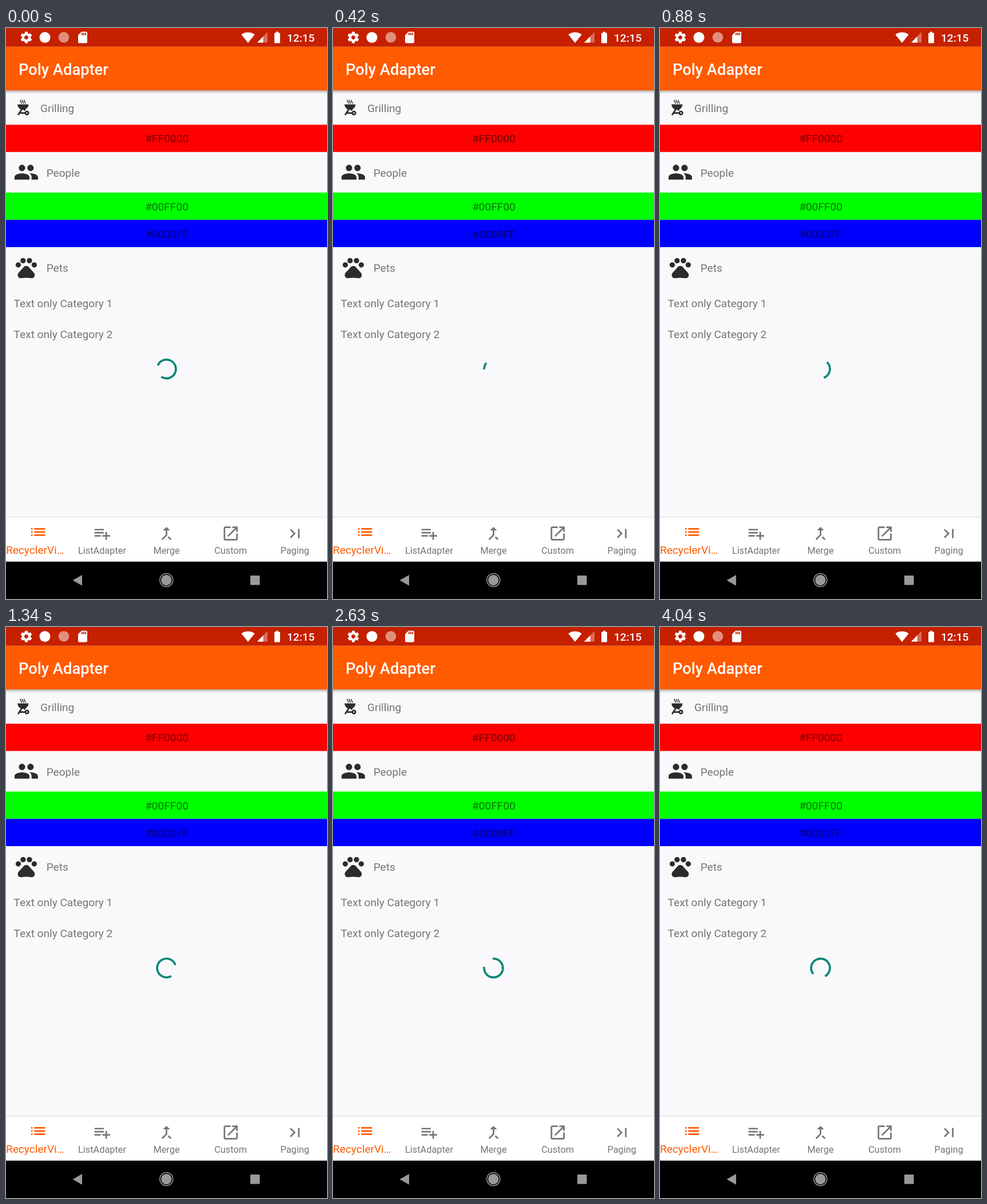
Recreate the animation shown at these times as an HTML page. Size 561 px wide and 998 px high, loop 4.08 s.

```html
<!DOCTYPE html>
<html lang="en">
<head>
<meta charset="utf-8">
<title>Adapter demo</title>
<style>
  html, body { margin: 0; width: 100%; height: 100%; overflow: hidden; background: #f9f9fb; }
  svg { display: block; width: 100%; height: 100%; }
  text { font: 19.09px Roboto, sans-serif; fill: #757575; }
  .title { font-size: 27.27px; font-weight: 500; fill: #fff; }
  .clock { font-weight: 500; fill: #fff; }
  .hex { fill: #000; fill-opacity: .54; }
  .hex, .tab { text-anchor: middle; }
  .tab { font-size: 16.36px; }
  .on { fill: #ff5b00; }
</style>
</head>
<body>
<svg id="stage" viewBox="0 0 561 998">
  <defs>
    <linearGradient id="shade" x2="0" y2="1">
      <stop stop-color="#000" stop-opacity=".28"/>
      <stop offset="1" stop-color="#000" stop-opacity="0"/>
    </linearGradient>
  </defs>
  <rect width="561" height="998" fill="#f9f9fb"/>
  <rect y="109" width="561" height="6" fill="url(#shade)"/>
  <rect y="32.7" width="561" height="76.4" fill="#ff5b00"/>
  <rect width="561" height="32.7" fill="#c52000"/>
  <text class="title" x="22" y="81.5">Poly Adapter</text>

  <!-- status bar -->
  <circle cx="68" cy="16.5" r="9.5" fill="#fff"/>
  <circle cx="101" cy="16.3" r="9.3" fill="#e18f7c"/>
  <path d="M439 25.500H457V7z" fill="#fff" fill-opacity=".35"/>
  <path d="M439 25.500H449.500V14.700z" fill="#fff"/>
  <text class="clock" x="491" y="23.500">12:15</text>

  <!-- list -->
  <rect y="169" width="561" height="47.7" fill="#f00"/>
  <rect y="287.600" width="561" height="47.800" fill="#0f0"/>
  <rect y="335.300" width="561" height="47.700" fill="#00f"/>
  <text x="60" y="146.700">Grilling</text>
  <text class="hex" x="281" y="200">#FF0000</text>
  <text x="70.700" y="260">People</text>
  <text class="hex" x="281" y="318.800">#00FF00</text>
  <text class="hex" x="281" y="366.500">#0000FF</text>
  <text x="70.700" y="426.300">Pets</text>
  <text x="13.600" y="488.200">Text only Category 1</text>
  <text x="13.600" y="541.800">Text only Category 2</text>
  <path id="spinner" fill="none" stroke="#008577" stroke-width="3.64" stroke-linecap="square"/>

  <!-- bottom tabs -->
  <rect y="854" width="561" height="3" fill="#ececee"/>
  <rect y="856" width="561" height="77" fill="#fff"/>
  <text class="on" x="0" y="918.700">RecyclerVi…</text>
  <text class="tab" x="168" y="918.700">ListAdapter</text>
  <text class="tab" x="280.500" y="918.700">Merge</text>
  <text class="tab" x="392.700" y="918.700">Custom</text>
  <text class="tab" x="504.700" y="918.700">Paging</text>

  <!-- system keys -->
  <rect y="932.700" width="561" height="66" fill="#000"/>
  <g fill="#999">
    <path d="M116.500 965.300L133 956V974.700z"/>
    <circle cx="280.300" cy="965" r="9.200"/>
    <circle cx="280.300" cy="965" r="11.500" fill="none" stroke="#999" stroke-width="1.500"/>
    <rect x="427" y="957" width="16.500" height="16.500" rx="1.200"/>
  </g>
</svg>
<script>
const stage = document.getElementById('stage');
const spinner = document.getElementById('spinner');

function add(tag, attrs) {
  const el = document.createElementNS('http://www.w3.org/2000/svg', tag);
  for (const key in attrs) el.setAttribute(key, attrs[key]);
  return stage.appendChild(el);
}

// Icons are drawn on a 24-unit grid.
function icon(x, y, scale, fill, d) {
  add('path', { d, fill, transform: `translate(${x} ${y}) scale(${scale})` });
}

const dp = 561 / 411.4, white = '#fff', dark = '#2c2c2c', gray = '#757575';

// settings, memory card, wifi, battery
icon(23.5, 4.5, 1, white, 'M19.43 12.98c.04-.32.07-.64.07-.98s-.03-.66-.07-.98l2.11-1.65c.19-.15.24-.42.12-.64l-2-3.46c-.12-.22-.39-.3-.61-.22l-2.49 1c-.52-.4-1.08-.73-1.69-.98l-.38-2.65C14.46 2.18 14.25 2 14 2h-4c-.25 0-.46.18-.49.42l-.38 2.65c-.61.25-1.17.59-1.69.98l-2.49-1c-.23-.09-.49 0-.61.22l-2 3.46c-.13.22-.07.49.12.64l2.11 1.65c-.04.32-.07.65-.07.98s.03.66.07.98l-2.11 1.65c-.19.15-.24.42-.12.64l2 3.46c.12.22.39.3.61.22l2.49-1c.52.4 1.08.73 1.69.98l.38 2.65c.03.24.24.42.49.42h4c.25 0 .46-.18.49-.42l.38-2.65c.61-.25 1.17-.59 1.69-.98l2.49 1c.23.09.49 0 .61-.22l2-3.46c.12-.22.07-.49-.12-.64l-2.11-1.65zM12 15.5c-1.93 0-3.5-1.57-3.5-3.5s1.57-3.5 3.5-3.5 3.5 1.57 3.5 3.5-1.57 3.5-3.5 3.5z');
icon(122, 4.5, 1, white, 'M18 2h-8L4.02 8 4 20c0 1.1.9 2 2 2h12c1.1 0 2-.9 2-2V4c0-1.1-.9-2-2-2zm-6 6h-2V4h2v4zm3 0h-2V4h2v4zm3 0h-2V4h2v4z');
icon(411, 4.5, 1, white, 'M12 21.5L23.64 7c-.45-.34-4.93-4-11.64-4S.81 6.66.36 7z');
icon(462, 4.5, 1, white, 'M15.67 4H14V2h-4v2H8.33C7.6 4 7 4.6 7 5.33v15.33C7 21.4 7.6 22 8.33 22h7.33c.74 0 1.34-.6 1.34-1.33V5.33C17 4.6 16.4 4 15.67 4z');

// grill, people, paw
icon(13.4, 122.7, dp, dark, 'M17 22c1.66 0 3-1.34 3-3s-1.34-3-3-3c-1.3 0-2.4.84-2.82 2H9.14l1.99-3.06c.29.04.58.06.87.06s.58-.02.87-.06l1.02 1.57c.42-.53.96-.95 1.6-1.21l-.6-.93C17.31 13.27 19 10.84 19 8H5c0 2.84 1.69 5.27 4.12 6.37l-3.95 6.08c-.3.46-.17 1.08.29 1.38.46.3 1.08.17 1.38-.29l1-1.55h6.34C14.6 21.16 15.7 22 17 22zm0-4c.55 0 1 .45 1 1s-.45 1-1 1-1-.45-1-1 .45-1 1-1z');
for (const shift of [0, 2.5, 5])
  icon(13.4 + shift * dp, 122.7, dp, dark, 'M9.41 7h1c.15-1.15.23-1.64-.89-2.96C9.1 3.54 8.84 3.27 9.06 2H8.07c-.21 1.18-.03 2.1.87 3.11C9.18 5.4 9.65 5.83 9.41 7z');
icon(13.1, 229.7, 1.86, dark, 'M16 11c1.66 0 2.99-1.34 2.99-3S17.66 5 16 5c-1.66 0-3 1.34-3 3s1.34 3 3 3zm-8 0c1.66 0 2.99-1.34 2.99-3S9.66 5 8 5C6.34 5 5 6.34 5 8s1.34 3 3 3zm0 2c-2.33 0-7 1.17-7 3.5V19h14v-2.5c0-2.33-4.67-3.5-7-3.5zm8 0c-.29 0-.62.02-.97.05 1.16.84 1.97 1.97 1.97 3.45V19h6v-2.5c0-2.33-4.67-3.5-7-3.5z');
const toe = 'a2.5 2.5 0 1 0 5 0a2.5 2.5 0 1 0-5 0z';
icon(13.1, 396.4, 1.86, dark, `M2 9.5${toe}M6.5 5.5${toe}M12.5 5.5${toe}M17 9.5${toe}` + 'M17.34 14.86c-.87-1.02-1.6-1.89-2.48-2.91-.46-.54-1.05-1.08-1.75-1.32-.11-.04-.22-.07-.33-.09-.25-.04-.52-.04-.78-.04s-.53 0-.79.05c-.11.02-.22.05-.33.09-.7.24-1.28.78-1.75 1.32-.87 1.02-1.6 1.89-2.48 2.91-1.31 1.31-2.92 2.76-2.62 4.79.29 1.02 1.02 2.03 2.33 2.32.73.15 3.06-.44 5.54-.44h.18c2.48 0 4.81.58 5.54.44 1.31-.29 2.04-1.31 2.33-2.32.31-2.04-1.3-3.49-2.61-4.8z');

const tabs = [
  'M3 13h2v-2H3zm0 4h2v-2H3zm0-8h2V7H3zm4 4h14v-2H7zm0 4h14v-2H7zM7 7v2h14V7z',
  'M14 10H2v2h12zm0-4H2v2h12zm4 8v-4h-2v4h-4v2h4v4h2v-4h4v-2zM2 16h8v-2H2z',
  'M17 20.41L18.41 19 15 15.59 13.59 17zM7.5 8H11v5.59L5.59 19 7 20.41l6-6V8h3.5L12 3.5z',
  'M19 19H5V5h7V3H5c-1.11 0-2 .9-2 2v14c0 1.1.89 2 2 2h14c1.1 0 2-.9 2-2v-7h-2zM14 3v2h3.59l-9.83 9.83 1.41 1.41L19 6.41V10h2V3z',
  'M5.59 7.41L10.18 12l-4.59 4.59L7 18l6-6-6-6zM16 6h2v12h-2z'
];
tabs.forEach((d, i) =>
  icon(56.1 + 112.2 * i - 12 * dp, i ? 867.2 : 864.5, dp, i ? gray : '#ff5b00', d));

// cubic-bezier(.4, 0, .2, 1), clamped to 0..1
function ease(x) {
  if (x <= 0) return 0;
  if (x >= 1) return 1;
  let lo = 0, hi = 1, s;
  for (let i = 0; i < 24; i++) {
    s = (lo + hi) / 2;
    const bx = 1.2 * s * (1 - s) ** 2 + .6 * s * s * (1 - s) + s ** 3;
    if (bx < x) lo = s; else hi = s;
  }
  return s * s * (3 - 2 * s);
}

const LOOP = 4080, CYCLE = 4000 / 3, TURN = 2222, CX = 280.5, CY = 596, R = 16.4;

function point(deg) {
  const a = deg * Math.PI / 180;
  return `${(CX + R * Math.sin(a)).toFixed(3)} ${(CY - R * Math.cos(a)).toFixed(3)}`;
}

// The head runs ahead in the first half of a cycle, the tail catches up in the second.
function draw(time) {
  const t = time % LOOP - 677;
  const f = t / CYCLE - Math.floor(t / CYCLE);
  const base = 3 + 360 * t / TURN + 90 * f;
  const tail = base + 270 * ease(2 * f - 1);
  const head = Math.max(base + 270 * ease(2 * f), tail + .5);
  spinner.setAttribute('d',
    `M${point(tail)}A${R} ${R} 0 ${head - tail > 180 ? 1 : 0} 1 ${point(head)}`);
}

const begin = performance.now();
function tick() {
  draw(performance.now() - begin);
  requestAnimationFrame(tick);
}
tick();
</script>
</body>
</html>
```
